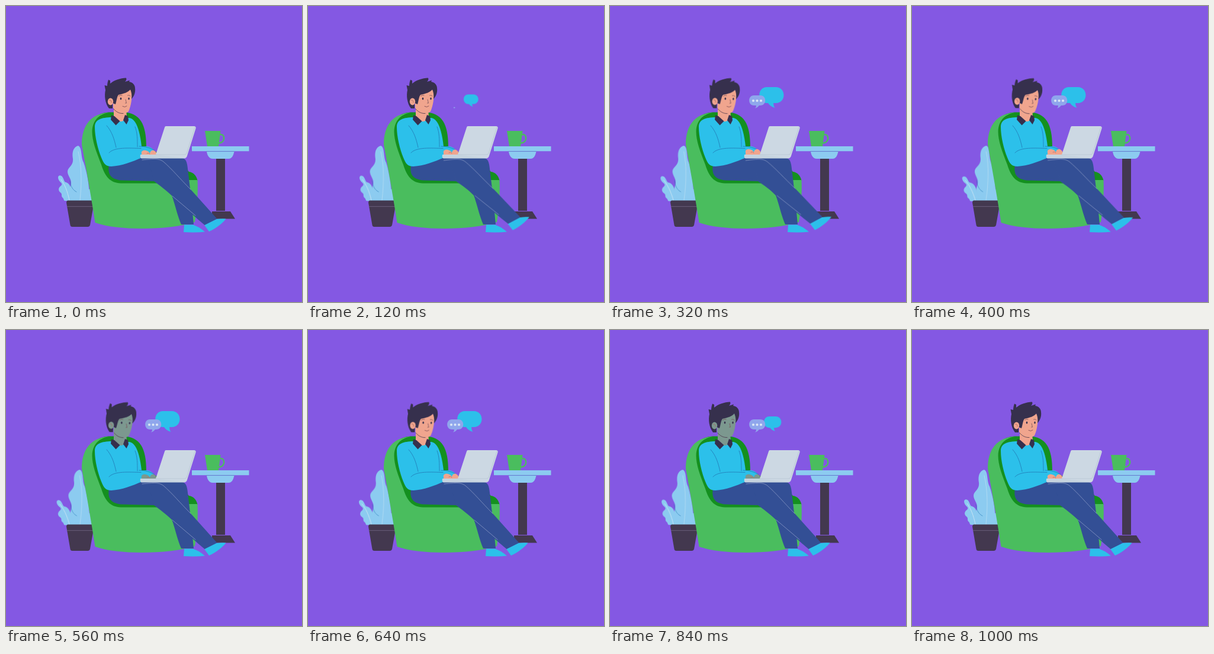
Write an HTML page that moves like this. It is 500 px wide and 500 px high and loops after 1320 ms.

```html
<!DOCTYPE html>
<html lang="en">
<head>
<meta charset="utf-8">
<title>Chatting in the armchair</title>
<style>
  html, body { margin: 0; width: 100%; height: 100%; overflow: hidden; background: #8458e3; }
  svg { display: block; width: 100vw; height: 100vh; }

  :root {
    --navy: #334f95; --cyan: #2cc0ea; --sky: #8ccbf0; --green: #4abd5e;
    --shade: #14901f; --dark: #43384f; --hair: #36304d; --skin: #f0a58e; --dull: #7c988f;
  }
  .navy { fill: var(--navy); } .cyan { fill: var(--cyan); } .sky { fill: var(--sky); }
  .green { fill: var(--green); } .shade { fill: var(--shade); } .dark { fill: var(--dark); }
  .hair { fill: var(--hair); }
  .line { fill: none; stroke-width: .8; stroke-linecap: round; }
  .seam { stroke: #2378b4; } .vein { stroke: #d5e9f5; } .fold { stroke: #8b9ac6; }

  /* Motion advances on a 40 ms beat: each segment is split into whole steps. */
  .skin, .smile, .head, .tall, .small, .shin, .hand, .big, .mini {
    animation: 1320ms -1ms infinite;
  }
  .skin  { fill: var(--skin); animation-name: skin; animation-timing-function: step-end; }
  .smile { animation-name: smile; animation-timing-function: step-end; }
  .head  { animation-name: nod; transform-origin: 190px 188px; }
  .tall  { animation-name: swayRight; transform-origin: 124px 329px; }
  .small { animation-name: swayLeft; transform-origin: 108px 328px; }
  .shin  { animation-name: kick; transform-origin: 262px 280px; }
  .hand  { animation-name: type; }
  .big   { animation-name: popBig; transform-origin: 279px 168px; }
  .mini  { animation-name: popMini; transform-origin: 247px 173px; }

  @keyframes skin {
    0%, 45.4545%, 66.6667% { fill: var(--skin); }
    42.4242%, 63.6364% { fill: var(--dull); }
  }
  @keyframes smile {
    0%, 45.4545%, 66.6667% { opacity: 1; }
    42.4242%, 63.6364% { opacity: 0; }
  }
  @keyframes nod {
    0% { transform: rotate(0deg); animation-timing-function: step-end; }
    15.1515% { transform: rotate(0deg); animation-timing-function: steps(5); }
    30.303% { transform: rotate(2.5deg); animation-timing-function: step-end; }
    42.4242% { transform: rotate(2.5deg); animation-timing-function: steps(4); }
    54.5455%, 100% { transform: rotate(0deg); }
  }
  @keyframes swayRight {
    0% { transform: rotate(0deg); animation-timing-function: steps(10); }
    30.303% { transform: rotate(2.3deg); animation-timing-function: steps(15); }
    75.7576%, 100% { transform: rotate(0deg); }
  }
  @keyframes swayLeft {
    0% { transform: rotate(0deg); animation-timing-function: steps(10); }
    30.303% { transform: rotate(-5deg); animation-timing-function: steps(15); }
    75.7576%, 100% { transform: rotate(0deg); }
  }
  @keyframes kick {
    0% { transform: rotate(0deg); animation-timing-function: steps(5); }
    15.1515% { transform: rotate(-2.7deg); animation-timing-function: steps(9); }
    42.4242%, 100% { transform: rotate(0deg); }
  }
  @keyframes type {
    0% { transform: translateY(0); animation-timing-function: steps(5); }
    15.1515% { transform: translateY(-2px); animation-timing-function: steps(5); }
    30.303% { transform: translateY(-2px); animation-timing-function: steps(4); }
    42.4242% { transform: translateY(0); animation-timing-function: steps(4); }
    54.5455% { transform: translateY(-2px); animation-timing-function: steps(3); }
    63.6364%, 100% { transform: translateY(0); }
  }
  @keyframes popBig {
    0% { transform: scale(0); animation-timing-function: steps(5); }
    15.1515% { transform: scale(1); animation-timing-function: step-end; }
    57.5758% { transform: scale(1); animation-timing-function: steps(2); }
    63.6364% { transform: scale(.71); animation-timing-function: steps(3); }
    72.7273%, 100% { transform: scale(0); }
  }
  @keyframes popMini {
    0% { transform: scale(0); animation-timing-function: step-end; }
    9.0909% { transform: scale(.1); animation-timing-function: steps(2); }
    15.1515% { transform: scale(.63); animation-timing-function: steps(2); }
    21.2121% { transform: scale(1); animation-timing-function: step-end; }
    63.6364% { transform: scale(1); animation-timing-function: steps(4); }
    75.7576%, 100% { transform: scale(0); }
  }
</style>
</head>
<body>
<svg viewBox="0 0 500 500">
  <!-- plant -->
  <path class="sky" d="M109 329C114 318 125 313 150 307V329Z"/>
  <g class="tall">
    <path class="sky" d="M122 236C114 238 111 247 113 258C114 268 107 271 104.500 277C102 285 110 290 110 299C110 305 106 309 109 316C112 322 113 326 116 329H140C142 310 138 285 131 264C126 255 129 239 122 236Z"/>
    <path class="line vein" d="M122 246C128 270 128 300 125 328" stroke-opacity=".6"/>
    <path class="line seam" d="M108 295C109 305 113 311 119 314" stroke-opacity=".75"/>
  </g>
  <g class="small">
    <path class="sky" d="M90 286.500C86.500 288 88 294 92 297.500C95 300 95 302 92.500 304C88 307 88 312 92 315C96 318 92 321 96 324C98 326 97 328 99 329H119C113 323 112 317 110 309C108 301 104 298 100 297.500C97 296 97 285 90 286.500Z"/>
    <path class="line vein" d="M93 293C99 301 104 313 107 328"/>
  </g>
  <path class="dark" d="M104 328.500H147Q150 329 149 333L147 342L142 370Q141 373 138 373H112Q109 373 108.500 370L102 332Q102 329 104 328.500Z"/>
  <path class="line" stroke="#75698a" d="M103 338.700H147"/>

  <!-- side table -->
  <path class="dark" d="M355 257H370V346H355ZM348 347H379L387 359.500H348Z"/>
  <path class="sky" d="M314 237H410.500V245.200H314ZM339 246H385.500C384 252 382 258 376 258H349C343 258 340 252 339 246Z"/>
  <path class="line" stroke="#5a83c4" d="M339 245.600H385"/>
  <path class="green" d="M336 211H362.500L359 237H340Z"/>
  <path d="M361 217.300C371 215 371 232 359 231.500" fill="none" stroke="#4abd5e" stroke-width="2.400"/>

  <!-- armchair -->
  <path class="shade" d="M140 212C142 190 155 179.500 177 179.500H197C227 180 237 200 237 238L300 270L309 280C317 281 322 287 323.500 295L300 304H165Z"/>
  <path class="green" d="M174 180C145 181.500 128 200 128 234C133.500 264 144.500 325 150.500 366C190 380 275 379 319 365C323 342 324.500 315 323.500 294H306L262 299.500H194C176 299 167 288 161 268C152 245 145.500 228 145.500 212C146 195 155 183 174 180Z"/>

  <!-- far leg -->
  <path class="navy" d="M250 257H298C304 258 306 264 307 275C310 300 313 322 317 369H296C289 353 286 336 280 320L245 285Z"/>
  <path class="cyan" d="M301 369.500H316L326 374Q332 378 336 381.500Q320 383 300 382Z"/>

  <!-- thigh -->
  <path class="navy" d="M174 268C171 284 177 293 195 294.500L251 296L272 280L262 257H222Z"/>

  <!-- near shin -->
  <g class="shin">
    <path class="cyan" d="M335 370L355 360Q364 359 371.500 359.500C365 368 354 376 343 381Z"/>
    <path class="navy" d="M240 259C253 256 260 257 266 262C283 278 297 295 313 311L356.500 359.500L335.500 370C306 346 280 317 250 296Z"/>
    <path class="line fold" d="M230 260C250 258 258 257 266 263C281 276 293 291 312 310M281 321L320 354"/>
  </g>

  <!-- far sleeve and body -->
  <path class="cyan" d="M220 237H239C246 239 251 242 252 252H222Z"/>
  <path class="cyan" d="M181 188C165 188 150 190 150 204C150 221 155 241 161 256C165 266 168 271 178 271C196 270 213 263 230 256L228 240L229 237C227 218 223 203 218 196C213 189 210 189 203 189Z"/>
  <path class="line seam" d="M170 202C179 212 183 225 186 239M174 248C183 238 207 240 228 240.500M218 204C222 214 222 226 222 238M225 237C236 237 244 240 251 244"/>

  <!-- neck and collar -->
  <path class="skin" d="M182 172H203L204 190L196 195H188L182 187Z"/>
  <path class="hair" d="M178 184.500L183 186L192.500 194.500L185.500 201.500L177 192ZM201 184L206 186L207 193L203.500 200L198 193Z"/>

  <!-- head -->
  <g class="head">
    <path class="skin" d="M181 148L188 138L212 142C213.500 156 211 169 207 178C201 184 187 180 181 172Z"/>
    <path class="line" stroke="#4a354a" d="M182 174C186 179 192 182 198 181.500"/>
    <path class="hair" d="M174 173C167 164 166 151 168 142L166.500 134L171 135C171 131 172 127 173 124.500L176 126L176 131C183 125 193 122 203 121.500C204 124 203 126 201 128L209 125.500L208 128C214 129 218 133 218 139C219 146 216 153 212 157C213 151 212 146 210 141C206 146 199 148 190 150C187 154 187 160 185 166L180 164V173Z"/>
    <ellipse class="skin" cx="176.500" cy="161.500" rx="4.700" ry="6"/>
    <path class="line" stroke="#a76663" d="M174.500 159Q178 158 178 163"/>
    <g class="hair">
      <ellipse cx="194" cy="156.500" rx="1.300" ry="2"/>
      <ellipse cx="207.500" cy="156.500" rx="1.200" ry="2"/>
    </g>
    <path class="line" stroke="#765058" d="M190.500 152Q193 150 196 151M205.500 151Q208 150 210 152M202 158L203.500 164H201.500"/>
    <path class="line smile" stroke="#75444f" d="M197 169.500Q201 172 204 169"/>
  </g>

  <!-- hands and laptop -->
  <g class="hand">
    <path class="skin" d="M229 255V249C228 246 231 243 236 244C241 245 244 248 244 255ZM243 255V250C243 246 246 243 250 244Q254 246 255 251V255Z"/>
    <path class="line" stroke="#bb6c65" d="M238 249Q241 247 243 250"/>
  </g>
  <path fill="#c5d3df" d="M227 251H306L304 256Q303 257.500 300 257.500H229Q226 257 227 251Z"/>
  <path fill="#ccd8e3" d="M270 203H318Q321.500 203.500 320.500 207L306 253Q305 257 301 257L253 251L268 205Q268.500 203 270 203Z"/>
  <path class="line" stroke="#b5c5d3" d="M253 251H302Q304.500 251 305.500 248L319 205"/>

  <!-- speech bubbles -->
  <path class="big cyan" d="M265 137H280C298 137 298 164 280 164H276Q276 169 278.500 172Q271 170 267 164H265C248 164 248 137 265 137Z"/>
  <g class="mini">
    <path fill="#8fa6ec" d="M243 151H254C265 151 265 168 254 168H252Q249 172 245 173Q247 171 247 168H243C232.500 168 232.500 151 243 151Z"/>
    <g fill="#d9e6f5">
      <circle cx="242" cy="160" r="2.100"/>
      <circle cx="248.500" cy="160" r="2.100"/>
      <circle cx="255" cy="160" r="2.100"/>
    </g>
  </g>
</svg>
</body>
</html>
```
